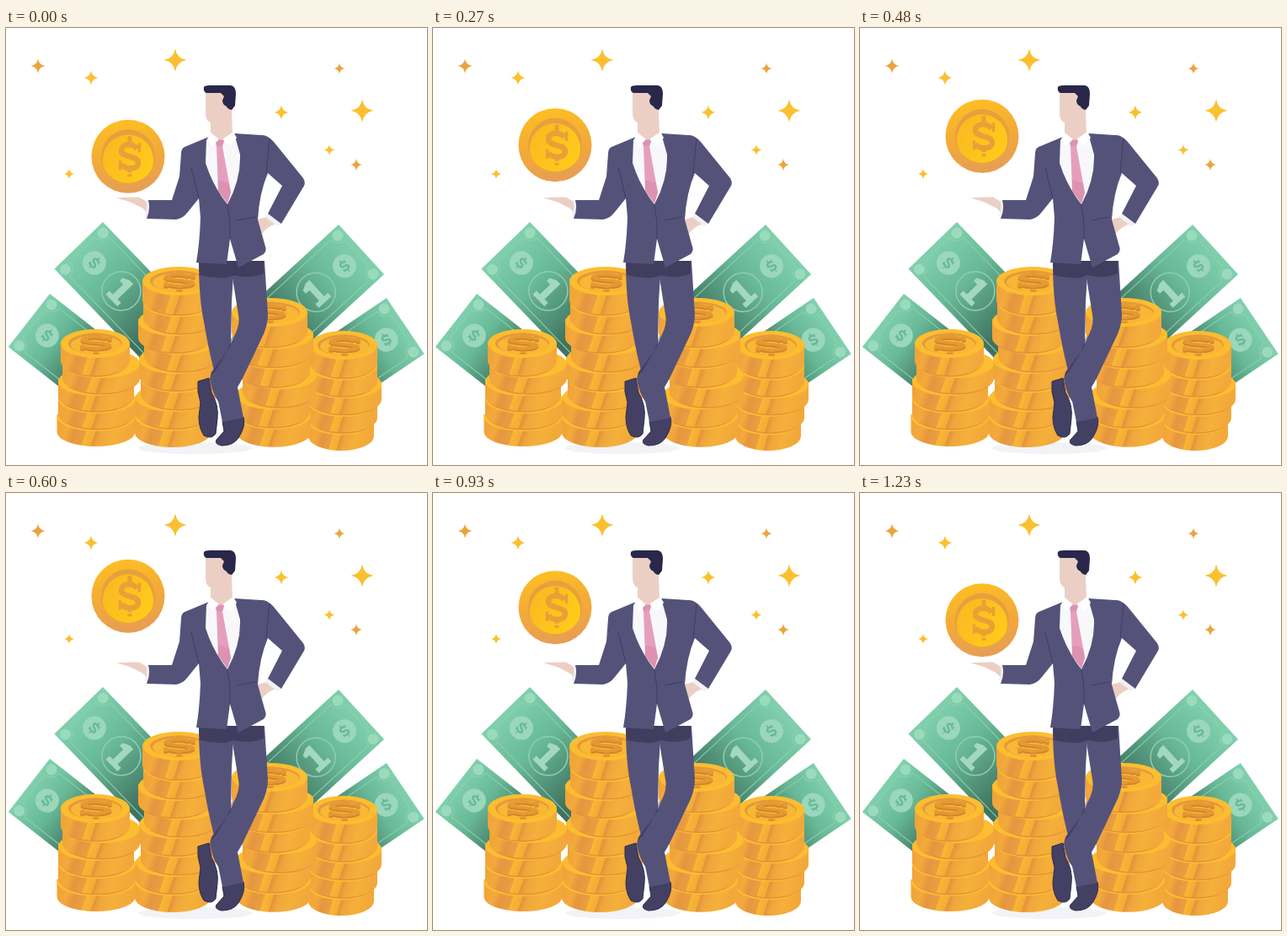
Animation of 500x518 px, one loop 1.26 s. Source, as an HTML page:

```html
<!DOCTYPE html>
<html>
<head>
<meta charset="utf-8">
<style>
  html, body { margin: 0; width: 100%; height: 100%; overflow: hidden; background: #fff; }
  svg { display: block; width: 100vw; height: 100vh; }
</style>
</head>
<body>
<svg viewBox="0 0 500 518">
  <defs>
    <linearGradient id="side" x2="1" y2=".15">
      <stop offset="0" stop-color="#f0a136"/>
      <stop offset=".2" stop-color="#f3a93c"/>
      <stop offset=".3" stop-color="#e5963f"/>
      <stop offset=".44" stop-color="#ea9f40"/>
      <stop offset=".45" stop-color="#f9b733"/>
      <stop offset=".56" stop-color="#f3ab38"/>
      <stop offset=".57" stop-color="#e29339"/>
      <stop offset=".64" stop-color="#efa63c"/>
      <stop offset=".8" stop-color="#f5b03a"/>
      <stop offset="1" stop-color="#f2a83a"/>
    </linearGradient>
    <linearGradient id="rim" x1=".4" y1="0" x2=".6" y2="1">
      <stop offset="0" stop-color="#ffbe22"/>
      <stop offset=".5" stop-color="#f3aa38"/>
      <stop offset="1" stop-color="#e69d56"/>
    </linearGradient>
    <linearGradient id="gold" x1="0" y1="0" x2="1" y2=".6">
      <stop offset="0" stop-color="#f8b722"/>
      <stop offset="1" stop-color="#ffcb1a"/>
    </linearGradient>
    <linearGradient id="note">
      <stop offset="0" stop-color="#80d0ae"/>
      <stop offset=".35" stop-color="#68b997"/>
      <stop offset=".8" stop-color="#40725f"/>
    </linearGradient>
    <linearGradient id="noteFlip" href="#note" x1="1" x2="0"/>
    <g id="dollar" fill="none">
      <path stroke-width="6.500" d="M9-9C5-16-10-16-10-7C-10 2 10-2 10 7.500C10 16-6 16-10 9"/>
      <path stroke-width="3.500" d="M-11.500 5V16M11.500-16V-5"/>
      <path stroke-width="5" d="M0-24V-14M0 13V19M0 21V24"/>
    </g>
  </defs>

  <ellipse cx="225" cy="498" rx="68" ry="7" fill="#f1f3f7"/>
  <g id="stars"></g>
  <g id="notes"></g>
  <g id="piles"></g>

  <g id="man">
    <!-- legs and shoes -->
    <g fill="#444063" stroke="#2d2a4a">
      <path d="M257 466L282 461Q285 472 276 486Q270 495 256 495Q247 493 250 488L259 478Z"/>
      <path d="M228 419L241 415L244 432Q253 447 251 463L249 481Q244 488 235 483Q229 474 229 461L231 444L228 431Z"/>
    </g>
    <path fill="#55527a" d="M229 276H271L268 325L267 380L272 410L282 462L257 467L250 432L246 402Q240 378 235 348Q229 320 229 276Z"/>
    <path fill="#55527a" d="M266 276H307L311 340Q311 354 303 369L284 409Q272 435 256 447Q246 438 242 416Q254 400 263 382L273 361Q278 350 276 340L269 296Z"/>
    <path fill="#434065" d="M244 408L267 377L266 372L271 362L263 382Q254 400 242 416Z"/>
    <path fill="#403d5f" d="M229 276H306V291Q290 298 270 293L262 296Q246 297 230 293Z"/>

    <!-- hands and cuffs -->
    <path fill="#ebcfc5" d="M131 201.500Q146 200 158 200.500L169 207L168 221Q164 213 157 211Q147 205 131 201.500Z"/>
    <path fill="#f1f0f6" d="M166 204L171 204L170 226L165 222Q169 213 166 204Z"/>
    <path fill="#ebcfc5" d="M298 227L314 223L322 232Q311 234 303 245Z"/>
    <path fill="#f1f0f6" d="M311 220L328 232L322 235L308 224Z"/>

    <!-- jacket -->
    <path fill="#55527a" d="M241 129L212 141Q208 143 208 149L206 176L197 204L169 204Q172 215 167 226L202 227Q210 226 216 218L229 202L231 225Q230 255 226 278L262 280L266 250L276 284L306 268Q310 264 308 259L299 227Q301 195 311 172L328 187L311 220L327 232L354 187Q356 183 353 178L318 135Q310 126 303 127L272 125Z"/>
    <path fill="none" stroke="#403d61" d="M263 209Q267 230 266 250M275 228L296 224M220 165L229 202M313 131L309 172"/>

    <!-- shirt and tie -->
    <path fill="#f8f8fb" d="M244 125L238 133L237 160Q246 188 263 209Q279 180 278 150L271 125Z"/>
    <path fill="#e59fbc" d="M248 131H260L257 140L267 195L263 208L252 193L250 140Z"/>
    <path fill="#d98bab" d="M248 131H260L257 140H250ZM252 180L265 184L267 195L263 208L252 193Z" opacity=".6"/>

    <!-- head -->
    <path fill="#ebcfc5" d="M237 76H258L272 92L268 98L269 125L255 133L243 126V112Q237 110 237 101Z"/>
    <path fill="#fff" d="M243 124L253 132L245 140L239 132ZM270 123L257 132L267 140L274 130Z"/>
    <path fill="#29274a" d="M235 70Q236 68 242 68H267Q273 69 273 78L272 92L268 97Q263 96 262 93Q257 91 257 86L259 81L255 77H238Q234 75 235 70Z"/>
  </g>

  <g id="coin">
    <circle r="43.500" fill="url(#rim)"/>
    <circle r="32" fill="#e7a03c"/>
    <path fill="url(#gold)" d="M-28 15A30 30 0 1 1 28 15A32 32 0 0 1-28 15Z"/>
    <use href="#dollar" x="2" stroke="#e9a036"/>
  </g>
</svg>
<script>
const byId = id => document.getElementById(id);
const YELLOW = '#fbc02f', ORANGE = '#eca341';

function star(x, y, r, fill) {
  const k = r * 0.14;
  return `<path fill="${fill}" transform="translate(${x} ${y})"
    d="M0 ${-r}Q${k} ${-k} ${r} 0Q${k} ${k} 0 ${r}Q${-k} ${k} ${-r} 0Q${-k} ${-k} 0 ${-r}"/>`;
}

// dir is 1 when the note runs right from its top corner, -1 when it runs left
function note(x, y, angle, dir, length, big) {
  const dot = cy => `<circle cx="${9.5 * dir}" cy="${cy}" r="6.5" fill="#9adabd"/>`;
  const left = dir > 0 ? 0 : -length;
  const value = big ? `<g transform="translate(${74 * dir} 41)">
    <circle r="23" fill="none" stroke="#8fceb1" stroke-width="1.5"/>
    <path fill="#a3d8c0" d="M-10 16V10H-4V-7H-10V-12L-2-16H4V10H10V16Z"/></g>` : '';
  return `<g transform="translate(${x} ${y}) rotate(${angle * dir})">
    <rect x="${left}" width="${length}" height="80" fill="url(#${dir > 0 ? 'note' : 'noteFlip'})"/>
    <path fill="none" stroke="#8bd0b1" d="M${length * dir} 7H${19 * dir}Q${18 * dir} 18 ${7 * dir} 19V61Q${18 * dir} 62 ${19 * dir} 73H${length * dir}"/>
    ${dot(9)}${dot(71)}
    <circle cx="${28 * dir}" cy="41" r="14" fill="#9ad7bb"/>
    <use href="#dollar" transform="translate(${28 * dir} 41) scale(.36)" stroke="#68b997"/>
    ${value}</g>`;
}

// coins lists [centre x, radius] from the top coin down
function pile(top, step, coins) {
  const ry = 17;
  const disc = (x, y, rx, fill, h = ry) =>
    `<ellipse cx="${x}" cy="${y}" rx="${rx}" ry="${h}" fill="${fill}"/>`;
  let out = '';
  for (let i = coins.length - 1; i >= 0; i--) {
    const [x, rx] = coins[i], y = top + step * i;
    out += `<path fill="url(#side)" d="M${x - rx} ${y}V${y + step}A${rx} ${ry} 0 0 0 ${x + rx} ${y + step}V${y}Z"/>`;
    out += disc(x, y + (i ? 3 : 0), rx, '#fdbd30');
    if (i) {
      const [ux, ur] = coins[i - 1];
      out += disc(ux, y + 1.5, ur - 2, '#e0913a');
    }
  }
  const [x, rx] = coins[0];
  const dollar = (dy, color) =>
    `<use href="#dollar" transform="translate(${x + 1} ${top + dy}) scale(1.4 .48)" stroke="${color}"/>`;
  return out + disc(x, top, rx - 9, '#e29a3d', 12.5) + disc(x + 1, top + 1.5, rx - 11, '#f8b735', 11) +
    dollar(1, '#d5842a') + dollar(-1, '#e39a33');
}

byId('stars').innerHTML = [
  [38, 45, 8.5, ORANGE], [101, 59, 8.5, YELLOW], [201, 38, 13.5, YELLOW],
  [75, 173, 6, YELLOW], [327, 100, 8.5, YELLOW], [396, 48, 6.5, ORANGE],
  [423, 98, 13.5, YELLOW], [384, 144.5, 6.5, YELLOW], [416, 162, 7, ORANGE]
].map(s => star(...s)).join('');

byId('notes').innerHTML =
  note(115, 230, 46, 1, 165, true) + note(52, 315, 38, 1, 110) +
  note(395, 233, 42.5, -1, 165, true) + note(452, 320, 34, -1, 110);

byId('piles').innerHTML =
  pile(300, 22.5, [[205, 43], [207, 44], [201, 44], [208, 44], [202, 44], [205, 45], [199, 45], [198, 45]]) +
  pile(374, 21, [[106, 41], [113, 46], [107, 45], [108, 46], [107, 46.5]]) +
  pile(376, 21.6, [[401, 40], [400, 41], [402, 44], [400, 41], [398, 39]]) +
  pile(337, 23.8, [[313, 45], [317, 48], [318, 43], [325, 44], [317, 44], [318, 44]]);

const LOOP = 1260, STEP = 30, RISE = 31.5;
function draw() {
  const t = Math.floor(performance.now() % LOOP / STEP) * STEP;
  const lift = RISE * (1 - Math.abs(2 * t / LOOP - 1));
  byId('coin').setAttribute('transform', `translate(145 ${152.3 - lift})`);
  requestAnimationFrame(draw);
}
draw();
</script>
</body>
</html>
```
